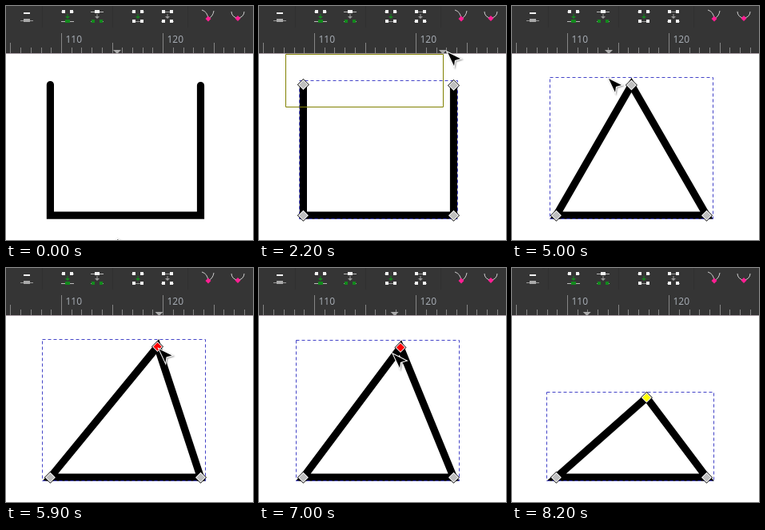
An HTML page with a canvas that plays this animation: 309x293 px, repeating every 8500 ms.

```html
<!DOCTYPE html>
<html>
<head>
<meta charset="utf-8">
<style>
html, body { margin: 0; width: 309px; height: 293px; overflow: hidden; background: #fff; }
canvas { display: block; }
</style>
</head>
<body>
<canvas id="stage" width="309" height="293"></canvas>
<script>
const ctx = document.getElementById('stage').getContext('2d');
const LOOP = 8500, STEP = 100, HALF = 4.6, RULER_END = 59;
const LEFT = 55.4, RIGHT = 243.5, TOP = 99, BASE = 262.2;
const GREEN = '#128a1c', GREY = '#999', WHITE = '#f2f2f2', PINK = '#ff1f93';
const CORNERS = [[LEFT, BASE], [RIGHT, BASE]];
const ENDS = [[LEFT, TOP - 0.5], [RIGHT, TOP + 0.5]];

// Pointer strokes: start time, end time, destination
const MOVES = [
  [0, 400, 149, 268],       // hover the path
  [800, 1300, 73, 141],
  [1300, 1600, 33, 126],
  [1700, 2200, 236, 58],    // rubber band
  [2200, 2500, 270, 63],
  [2600, 3000, 137, 60],    // to the join button
  [3000, 3400, 83, 8],
  [4100, 4600, 121, 91],
  [5000, 5500, 151, 102],   // to the joined node
  [5700, 5800, 191.5, 101.5],
  [6200, 6700, 179, 102.5],
  [6900, 7000, 168, 108],
  [7000, 7300, 170.4, 165.3],
  [7500, 8200, 31, -26]
];

function pointerAt(t) {
  let px = 139, py = 292;
  for (const [start, end, x, y] of MOVES) {
    if (t <= start) break;
    const k = Math.min(1, (t - start) / (end - start));
    px += (x - px) * k;
    py += (y - py) * k;
  }
  return [px, py];
}

// The dragged node trails the pointer by one step
function apexAt(t) {
  if (t < 5800) return [(LEFT + RIGHT) / 2, TOP];
  const [x, y] = pointerAt(Math.min(t, 7500) - STEP);
  return [x - 2, y - 3];
}

function box(x, y, w, h, color) {
  ctx.fillStyle = color;
  ctx.fillRect(x, y, w, h);
}

function trace(points, closed) {
  ctx.beginPath();
  points.forEach(([x, y]) => ctx.lineTo(x, y));
  if (closed) ctx.closePath();
}

function stroke(color, width = 1) {
  ctx.strokeStyle = color;
  ctx.lineWidth = width;
  ctx.stroke();
}

function fill(color) {
  ctx.fillStyle = color;
  ctx.fill();
}

function diamond(x, y, r, color) {
  trace([[x, y - r], [x + r, y], [x, y + r], [x - r, y]], true);
  fill(color);
}

function node([x, y], color) {
  diamond(x, y, 7.5, '#000');
  diamond(x, y, 6.5, '#fff');
  diamond(x, y, 5.2, color);
}

// Two nodes, joined by a segment or with their segments outside
function pair(x, y, color, joined) {
  if (joined) box(x - 4, y, 8, 1, GREY);
  for (const side of [-1, 1]) {
    if (!joined) box(x + side * 7 - 1, y, 2, 1, GREY);
    box(x + side * 5 - 2, y - 2, 4, 4, color);
  }
}

function single(x, y, color) {
  box(x - 8, y, 16, 1, '#bbb');
  box(x - 3, y - 2, 6, 4, color);
}

function downArrow(x, color) {
  box(x - 0.5, 10, 1, 3, color);
  trace([[x - 3, 13], [x + 3, 13], [x, 16]], true);
  fill(color);
}

function icons() {
  const upper = 7, lower = 19;
  box(22, 8, 8, 2, WHITE);
  box(18, 18, 16, 1, GREY);
  box(22, 16, 8, 4, '#aaa');
  pair(77, upper, WHITE);        downArrow(77, GREEN);  single(77, lower, GREEN);
  single(114, upper, WHITE);     downArrow(114, GREY);  pair(114, lower, GREEN);
  pair(165, upper, WHITE);       downArrow(165, GREEN); pair(165, lower, WHITE, true);
  pair(202, upper, WHITE, true); downArrow(202, GREY);  pair(202, lower, WHITE);

  ctx.beginPath();
  ctx.moveTo(245, 5);
  ctx.quadraticCurveTo(252, 7, 253, 16);
  ctx.quadraticCurveTo(259, 13, 260, 6);
  stroke('#ccc');
  ctx.beginPath();
  ctx.arc(290, 7, 8, 0, Math.PI);
  stroke('#ccc');
  diamond(253, 16, 3.5, PINK);
  diamond(290, 15.5, 3.5, PINK);
}

function ruler(markerX) {
  ctx.font = '12px "Noto Sans", sans-serif';
  for (let i = -5; i < 19; i++) {
    const top = i % 10 === 0 ? 34 : i % 5 === 0 ? 46 : 52;
    const x = Math.round(69 + i * 12.71);
    box(x, top, 1, RULER_END - top, '#858585');
    if (i % 10 === 0) {
      ctx.fillStyle = '#a3a9b0';
      ctx.fillText(110 + i, x + 5.5, 46);
    }
  }
  trace([[markerX - 5, 55], [markerX + 5, 55], [markerX, 60]], true);
  fill('#aaa');
}

function toolbar(pressed, markerX) {
  box(0, 0, 309, RULER_END, '#353535');
  box(0, RULER_END, 309, 1, '#a89ba3');
  for (const x of [45, 133, 227]) box(x, 0, 1, 27, '#303030');
  if (pressed) {
    ctx.beginPath();
    ctx.roundRect(59, -4, 36, 34, 3);
    fill('#202020');
  }
  icons();
  ruler(markerX);
}

function dashedBox(...edges) {
  const [l, t, r, b] = edges.map(v => Math.floor(v) + 0.5);
  ctx.setLineDash([4, 3]);
  trace([[l, t], [r, t], [r, b], [l, b]], true);
  stroke('#4444c8');
  ctx.setLineDash([]);
}

function openShape(t) {
  trace([ENDS[0], ...CORNERS, ENDS[1]]);
  ctx.lineCap = 'round';
  stroke('#000', HALF * 2);
  ctx.lineCap = 'butt';
  if (t >= 400 && t < 600) stroke('#f00');
  if (t < 600) return;
  dashedBox(LEFT - HALF, TOP - HALF - 0.5, RIGHT + HALF, BASE + HALF);
  CORNERS.forEach(p => node(p, '#bebebe'));
  ENDS.forEach(p => node(p, t >= 2600 ? '#ff0' : '#bebebe'));
}

function triangle(t) {
  const apex = apexAt(t), [x, y] = apex;
  trace([apex, ...CORNERS], true);
  stroke('#000', HALF * 2);

  // Extent of the mitred outline
  const a = Math.atan2(BASE - y, x - LEFT), b = Math.atan2(BASE - y, RIGHT - x);
  const tip = HALF / Math.cos((a + b) / 2) * Math.cos((a - b) / 2);
  const rise = Math.abs(HALF / Math.sin((Math.PI - a - b) / 2) * Math.cos((a - b) / 2)) || tip;
  dashedBox(LEFT - HALF / Math.tan(a / 2), y - rise,
    RIGHT + HALF / Math.tan(b / 2), BASE + HALF);

  CORNERS.forEach(p => node(p, '#bebebe'));
  const idle = t >= 4800 && t < 5500, hot = t >= 5500 && t < 7500;
  node(apex, hot ? '#f00' : idle ? '#bebebe' : '#ff0');
}

function pointer(x, y) {
  const overToolbar = y < 58;
  const shape = overToolbar
    ? [[0, 0], [0, 18], [4, 14.5], [7.5, 23.5], [11, 22], [7.5, 13.5], [13, 13.5]]
    : [[0, 0], [16, 8], [9, 10], [8, 17]];
  ctx.save();
  ctx.translate(x, y);
  ctx.shadowColor = 'rgba(0,0,0,.4)';
  ctx.shadowBlur = 2;
  ctx.shadowOffsetX = ctx.shadowOffsetY = 1;
  trace(shape, true);
  stroke('#fff', 2);
  ctx.shadowColor = 'transparent';
  fill(overToolbar ? '#333' : '#000');
  ctx.restore();
}

function draw(now) {
  const t = Math.floor(now % LOOP / STEP) * STEP;
  const trailing = Math.max(0, t - 15);
  box(0, 0, 309, 293, '#fff');
  if (t < 3900) openShape(t); else triangle(t);
  if (t >= 1700 && t < 2600) {
    const [x, y] = pointerAt(trailing);
    ctx.beginPath();
    ctx.rect(33.5, 126.5, Math.round(x) - 33, Math.round(y) - 126);
    stroke('#808000');
  }
  // The ruler mark stays where the pointer last left the canvas
  let seen = trailing;
  while (pointerAt(seen)[1] < 58) seen -= 10;
  toolbar(t === 3800, pointerAt(seen)[0]);
  pointer(...pointerAt(t));
  requestAnimationFrame(draw);
}
requestAnimationFrame(draw);
</script>
</body>
</html>
```
